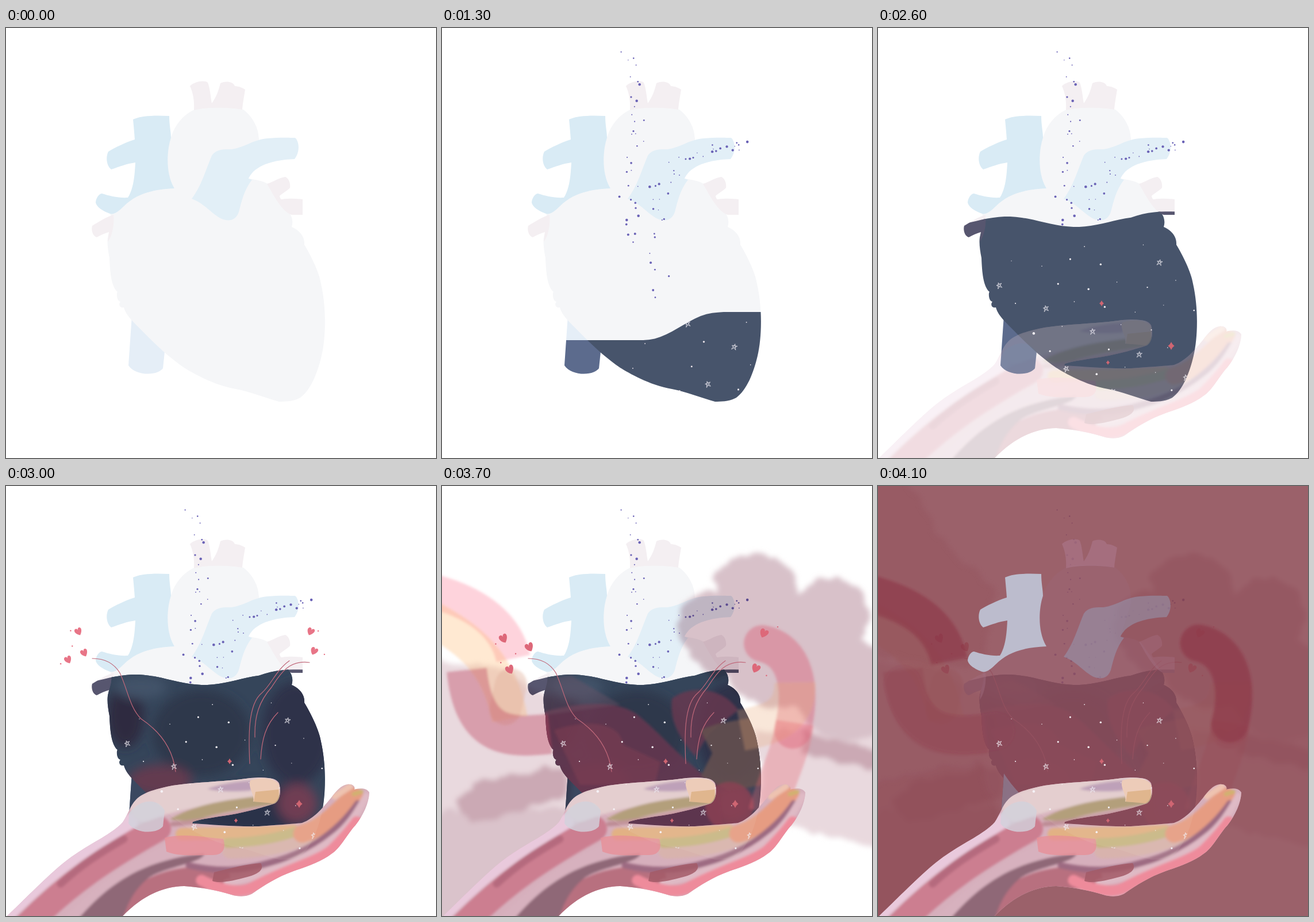
These frames come from a looping animation (748 by 748 pixels, 4.2 s). An HTML page:

```html
<!DOCTYPE html>
<html lang="en">
<head>
<meta charset="utf-8">
<title>Heart in hand</title>
<style>
  html, body { margin: 0; width: 100%; height: 100%; overflow: hidden; background: #fff; }
  svg { display: block; width: 100vw; height: 100vh; }
  .line { fill: none; stroke-linecap: round; stroke-linejoin: round; }
  .butt { fill: none; stroke-linecap: butt; stroke-linejoin: round; }
  #clouds { mix-blend-mode: multiply; }
</style>
</head>
<body>
<svg viewBox="0 0 748 748" xmlns="http://www.w3.org/2000/svg">
  <defs>
    <path id="body" d="M181,323C200,308 222,287 260,282C275,280 285,280 293,279C275,250 278,205 288,188C295,165 315,143 340,138C365,135 400,138 413,142C430,155 440,175 440,195L440,205L422,262L428,263C440,265 450,267 458,273C470,290 480,305 490,318C498,327 500,337 497,346C510,352 520,362 519,377C530,395 545,425 548,445C558,490 556,540 549,570C542,600 530,630 512,643C500,650 485,650 475,650C450,643 425,633 400,628C360,621 325,600 310,591C275,567 250,540 230,520C215,505 208,497 205,486C198,488 195,481 199,476C192,475 192,460 194,459C183,450 181,425 180,400C177,385 175,370 178,360C182,345 186,335 181,323Z"/>
    <path id="cava" d="M221,159C235,152 260,152 284,153C284,170 287,180 287,191C279,215 278,255 293,279C250,281 225,290 205,310C195,320 187,325 181,323C170,319 157,312 156,303C157,295 162,288 167,288C180,292 195,296 212,295C222,280 224,255 225,234C210,236 198,241 183,246C175,240 173,225 178,215C190,208 205,200 224,194C223,180 222,170 221,159Z"/>
    <path id="arch" d="M327,143C328,125 325,112 320,101C328,93 345,90 351,95C355,105 356,120 358,131C366,120 370,108 373,96C380,92 395,92 398,101C405,101 413,105 416,107C414,120 412,130 411,142C390,138 350,137 327,143Z"/>
    <path id="sides" d="M454,271C465,268 475,260 486,259C493,262 495,272 494,278C488,284 480,288 476,292C477,297 478,298 480,298C495,296 507,297 516,298L516,325L497,325C480,320 465,290 454,271ZM187,325C175,328 160,338 150,344C148,350 150,362 158,364C165,360 172,357 179,355L177,372C185,362 189,340 187,325Z"/>
    <path id="artery" d="M323,297C340,275 348,245 358,222C366,210 380,211 392,211C415,208 430,194 455,192C475,190 495,191 503,191C510,197 512,215 502,228C480,229 450,232 430,250C424,257 422,261 422,262L428,264C415,280 410,300 405,320C400,335 388,337 375,332C360,325 345,305 323,297Z"/>
    <path id="stem" d="M219,500L213,587C225,605 262,606 273,592L276,563C255,545 235,525 219,500Z"/>
    <path id="palm" d="M2,748C40,712 85,664 120,641C150,620 185,605 203,585C212,572 216,556 226,546C238,533 260,527 290,521C330,515 385,514 425,508C450,506 470,507 475,517C479,530 477,546 468,552C450,558 420,567 390,572C365,576 340,579 325,584L324,587C360,589 400,593 440,592C470,590 500,588 515,586C535,579 550,561 565,543C575,530 582,521 594,519C602,518 608,522 606,528C615,525 628,525 632,533C631,552 622,572 608,590C593,606 582,630 566,640C548,654 520,663 500,670C470,681 450,694 430,708C420,715 405,715 392,711C370,704 340,698 310,696C275,697 240,710 203,748Z"/>
    <path id="star" class="line" d="M-4,5L0,-6L4,5L-5,-2L5,-3Z" stroke="#f1eef4" stroke-width=".8"/>
    <path id="love" d="M0,1.2C-1.4,.2 -1.2,-1 -.5,-1Q0,-1 0,-.4Q.1,-1 .6,-1C1.3,-.9 1.2,.2 0,1.2Z"/>
    <path id="spark" d="M0,-1Q.3,-.3 .8,0Q.3,.3 0,1Q-.3,.3 -.8,0Q-.3,-.3 0,-1Z" fill="#cf6572"/>
    <clipPath id="level"><path id="surface"/></clipPath>
    <clipPath id="inBody"><use href="#body"/></clipPath>
    <clipPath id="inPalm"><use href="#palm"/></clipPath>
    <filter id="soft" x="-20%" y="-20%" width="140%" height="140%"><feGaussianBlur stdDeviation="2"/></filter>
    <filter id="mist" x="-40%" y="-40%" width="180%" height="180%"><feGaussianBlur stdDeviation="9"/></filter>
    <filter id="puff" filterUnits="userSpaceOnUse" x="-60" y="-60" width="868" height="868">
      <feTurbulence type="fractalNoise" baseFrequency=".03" numOctaves="3" seed="4"/>
      <feDisplacementMap in="SourceGraphic" scale="24" xChannelSelector="R" yChannelSelector="G"/>
      <feGaussianBlur stdDeviation="5"/>
    </filter>
  </defs>

  <use href="#stem" fill="#e5eef7"/>
  <use href="#body" fill="#f5f6f8"/>
  <use href="#cava" fill="#d9ebf5"/>
  <use href="#arch" fill="#f4eff2"/>
  <use href="#sides" fill="#f4eff2"/>
  <use href="#artery" fill="#e2eff7"/>
  <g id="dots" fill="#6a62b6"></g>

  <g clip-path="url(#level)">
    <use href="#stem" fill="#5c6b8d"/>
    <use href="#body" fill="#47546b"/>
    <use href="#sides" fill="#57566f"/>
    <g id="nebula">
      <use href="#stem" fill="#3b4860"/>
      <g clip-path="url(#inBody)">
        <use href="#body" fill="#35455a"/>
        <g filter="url(#mist)">
          <ellipse cx="208" cy="400" rx="32" ry="55" fill="#2f2940"/>
          <ellipse cx="340" cy="430" rx="85" ry="75" fill="#2d374b"/>
          <ellipse cx="505" cy="430" rx="60" ry="90" fill="#2e334a"/>
          <ellipse cx="430" cy="560" rx="110" ry="45" fill="#2b3149"/>
          <ellipse cx="235" cy="350" rx="45" ry="20" fill="#435369"/>
          <ellipse cx="268" cy="512" rx="55" ry="27" fill="#643a50"/>
          <ellipse cx="507" cy="552" rx="34" ry="34" fill="#703d53"/>
        </g>
      </g>
    </g>
    <g id="early" clip-path="url(#inBody)" fill="#f1e9ef"></g>
  </g>

  <g id="clouds">
    <g filter="url(#puff)">
      <path fill="#e9d9de" d="M-40,300L90,310L190,370L230,480L220,600L60,780L-60,780ZM545,430L800,400L800,620C730,645 650,590 560,585Z"/>
      <path fill="#dac3cb" d="M-40,570L215,560L210,620L40,790L-40,790Z"/>
      <g fill="#d8c1c9">
        <circle cx="545" cy="188" r="73"/><circle cx="462" cy="240" r="54"/>
        <circle cx="676" cy="228" r="67"/><circle cx="590" cy="285" r="102"/>
        <circle cx="705" cy="355" r="90"/><circle cx="480" cy="285" r="48"/>
      </g>
      <path fill="#cba9b4" d="M28,555C40,510 110,510 150,498C200,480 230,505 215,540C150,560 80,590 40,585ZM630,420C670,455 720,440 770,465L770,492C700,490 660,470 625,465Z"/>
    </g>
  </g>

  <g id="arms">
    <g clip-path="url(#inBody)">
      <g filter="url(#soft)">
        <path fill="#67384f" fill-opacity=".85" d="M170,395C240,375 310,370 345,402C390,440 420,480 480,520L490,610L190,610Z"/>
        <path fill="#6f5468" fill-opacity=".4" d="M170,335L225,330L310,380L170,400Z"/>
        <path fill="#8f4055" fill-opacity=".35" d="M195,425C250,405 310,410 315,450L380,480L370,520L240,520Z"/>
        <path fill="#693a50" fill-opacity=".8" d="M400,370C430,345 490,350 515,390L465,430L440,470C415,440 395,410 400,370Z"/>
        <path fill="#64504f" fill-opacity=".9" d="M450,425C490,405 530,410 560,395L560,520L500,530L450,505L470,465Z"/>
        <circle fill="#8c4254" fill-opacity=".8" cx="500" cy="557" r="42"/>
      </g>
    </g>
    <g filter="url(#soft)">
      <path class="butt" stroke="#fa6e8c" stroke-opacity=".3" stroke-width="60" d="M-20,182C50,200 110,235 124,300"/>
      <path class="butt" stroke="#ffb76a" stroke-opacity=".3" stroke-width="62" d="M-20,230C45,265 100,305 118,405"/>
      <path class="line" stroke="#e0b09a" stroke-opacity=".4" stroke-width="56" d="M120,345L110,388"/>
      <path class="butt" stroke="#be4660" stroke-opacity=".4" stroke-width="70" d="M43,320C55,435 110,440 188,431"/>
      <path class="line" stroke="#dc506a" stroke-opacity=".36" stroke-width="64" d="M557,274C615,285 628,350 610,425"/>
      <path class="butt" stroke="#e8a878" stroke-opacity=".28" stroke-width="72" d="M614,342C615,405 570,415 520,425"/>
      <path class="butt" stroke="#e66470" stroke-opacity=".33" stroke-width="66" d="M614,412C605,470 585,500 565,570"/>
    </g>
  </g>

  <g id="branches" class="line" stroke="#c0687a" stroke-width="1.2">
    <path d="M150,300C175,300 190,312 198,325C212,355 215,385 235,405C265,425 290,455 295,497"/>
    <path d="M493,304C470,320 462,345 445,360C420,380 422,440 424,483"/>
    <path d="M528,307C490,302 475,330 462,350C440,375 432,400 433,437"/>
    <path d="M473,394C452,415 445,440 443,475"/>
  </g>
  <g id="buds" fill="#e87587"></g>
  <g id="drift" fill="#dd6879"></g>

  <g id="wash">
    <rect width="748" height="748" fill="#8a4651" opacity=".85"/>
    <g filter="url(#puff)" fill="#8c4450" opacity=".22">
      <path d="M-40,-40L40,-20L110,90L200,180L190,320L-40,290Z"/>
      <path d="M-40,520L180,480L210,580L20,760L-40,760Z"/>
    </g>
    <g class="line" stroke="#8b2f3e" stroke-opacity=".45" stroke-width="64" filter="url(#soft)">
      <path class="butt" d="M-20,186C50,204 110,235 124,305"/>
      <path d="M558,273C615,285 630,350 612,414"/>
      <path stroke-opacity=".13" d="M43,345C65,435 130,440 205,426"/>
    </g>
    <use href="#body" fill="#a07c9c" opacity=".12"/>
    <use href="#arch" fill="#aa778a" opacity=".6"/>
    <use href="#sides" fill="#aa778a" opacity=".35"/>
    <use href="#artery" fill="#9791ab" opacity=".6"/>
    <use href="#stem" fill="#8f7c92" opacity=".8"/>
    <use href="#cava" fill="#bcbccd"/>
  </g>

  <g id="hand">
    <use href="#palm" fill="#d6afbc"/>
    <g clip-path="url(#inPalm)">
      <g filter="url(#soft)" class="line">
        <path stroke="#e9c9dc" stroke-width="28" d="M0,746C65,682 125,632 215,584"/>
        <path stroke="#cc7e90" stroke-width="44" d="M35,765C110,690 170,650 265,596"/>
        <path stroke="#b56a7e" stroke-width="13" d="M95,692C130,660 160,640 205,614"/>
        <path stroke="#d7b1be" stroke-width="27" d="M105,765C170,700 230,655 320,620"/>
        <path stroke="#b8707f" stroke-width="40" d="M205,745C235,700 290,678 370,682"/>
        <path fill="#8f6877" d="M120,760C170,700 230,650 345,640C340,655 280,662 250,680C225,700 210,725 202,760Z"/>
        <path stroke="#e3cccf" stroke-width="48" d="M240,560C290,540 340,530 445,520"/>
        <path fill="#b99ab6" d="M350,527C380,515 420,512 440,512L425,530C400,532 370,532 350,527Z"/>
        <path fill="#ad9772" d="M285,580C340,547 400,545 478,535L478,552C420,560 350,572 325,584Z"/>
        <path stroke="#bd8b94" stroke-width="8" d="M290,588C350,584 410,568 465,560"/>
        <path stroke="#d8b3ad" stroke-width="28" d="M390,634C460,634 520,620 575,575"/>
        <path stroke="#e2b184" stroke-width="22" d="M306,606C370,603 430,605 500,600"/>
        <path stroke="#c7b683" stroke-width="17" d="M385,621C430,620 470,613 505,601"/>
        <path stroke="#e69c82" stroke-width="31" d="M515,605C555,595 580,560 606,540"/>
        <path stroke="#eec3b0" stroke-width="11" d="M572,540L598,523"/>
        <path stroke="#cfb36e" stroke-width="7" d="M605,536L618,532"/>
        <path stroke="#9d6b82" stroke-width="11" d="M318,660C370,672 410,670 460,655C520,640 575,605 612,552"/>
        <path stroke="#dfbac5" stroke-width="13" d="M385,690C460,675 530,645 570,612C600,590 615,560 627,540"/>
        <path stroke="#ee8b9b" stroke-width="19" d="M340,686C380,706 410,708 430,698C480,670 540,655 567,633C580,620 595,605 610,584"/>
      </g>
      <path fill="#e98e96" fill-opacity=".75" d="M276,612C310,603 350,612 378,614C383,630 378,642 360,642C330,642 300,645 279,636Z"/>
      <path fill="#a45b68" fill-opacity=".85" d="M362,672C390,665 420,657 443,656C450,666 440,675 420,680C395,687 370,692 359,687Z"/>
      <path fill="#edc9b6" d="M425,512C445,506 470,508 475,520C478,535 474,545 465,550L430,549C433,535 420,525 425,512Z"/>
      <path fill="#dfb187" d="M434,532L474,528Q477,546 465,552L431,549Z"/>
      <path fill="#d2d2dc" fill-opacity=".8" d="M214,570C235,540 268,545 276,565L273,592C262,606 225,605 213,587Z"/>
      <use href="#body" fill="#e5dfc8" opacity=".1"/>
    </g>
  </g>

  <g id="late" clip-path="url(#inBody)" fill="#f6f2f6">
    <use href="#spark" transform="translate(389 479) scale(5)"/>
    <use href="#spark" transform="translate(510 553) scale(7)"/>
    <use href="#spark" transform="translate(400 582) scale(4)"/>
  </g>
</svg>

<script>
const $ = id => document.getElementById(id);
const FRAME = 100, COUNT = 42;

const ramp = (f, a, b) => Math.min(1, Math.max(0, (f - a) / (b - a)));
const smooth = (x, a, b) => { const p = ramp(x, a, b); return p * p * (3 - 2 * p); };
const lerp = (a, b, p) => a + (b - a) * p;

function seeded(seed) {
  return () => {
    seed = (seed * 1664525 + 1013904223) % 4294967296;
    return seed / 4294967296;
  };
}

function add(parent, tag, attrs) {
  const el = document.createElementNS('http://www.w3.org/2000/svg', tag);
  for (const key in attrs) el.setAttribute(key, attrs[key]);
  parent.append(el);
  return el;
}

// Point at fraction t of a polyline.
function along(points, t) {
  const at = t * (points.length - 1), i = Math.min(Math.floor(at), points.length - 2);
  return [0, 1].map(k => lerp(points[i][k], points[i + 1][k], at - i));
}

// Particles drift evenly down a stream, scattered to both sides of it.
function stream(points, count, spread, seed) {
  const random = seeded(seed);
  return Array.from({ length: count }, (_, i) => {
    const [x, y] = along(points, i / (count - 1));
    return add($('dots'), 'circle', {
      cx: x + (random() * 2 - 1) * spread,
      cy: y + (random() * 2 - 1) * spread / 2,
      r: .7 + 1.6 * random()
    });
  });
}

// Evenly spread night sky; every fifth light is a scribbled star.
function sky(parent, count, seed) {
  const random = seeded(seed);
  for (let i = 0; i < count; i++) {
    const x = 190 + 360 * ((seed * .37 + i * .7549) % 1), y = 375 + 265 * ((seed * .61 + i * .5698) % 1);
    if (i % 5) add(parent, 'circle', { cx: x, cy: y, r: .7 + 1.6 * random() ** 2 });
    else add(parent, 'use', { href: '#star', transform: `translate(${x} ${y}) rotate(${random() * 40 - 20}) scale(.9)` });
  }
}

// Little hearts lean away from the middle, each with a crumb beside it.
function hearts(parent, points, size, seed) {
  const random = seeded(seed);
  for (const [x, y] of points) {
    const side = x < 374 ? -1 : 1;
    add(parent, 'use', { href: '#love', transform: `translate(${x} ${y}) rotate(${side * 25}) scale(${size})` });
    add(parent, 'circle', { cx: x + side * (10 + 15 * random()), cy: y + 30 * random() - 15, r: 1.2 });
  }
}

const drops = [
  ...stream([[320, 38], [336, 130], [342, 205], [320, 300], [336, 375]], 34, 16, 5),
  ...stream([[540, 205], [485, 208], [415, 224], [378, 275], [376, 335], [382, 470]], 41, 17, 9)
].sort((a, b) => a.getAttribute('cy') - b.getAttribute('cy'));
sky($('early'), 34, 3);
sky($('late'), 45, 8);
hearts($('buds'), [[126, 253], [108, 302], [136, 290], [530, 253], [536, 287]], 6, 2);
hearts($('drift'), [[107, 265], [152, 280], [118, 319], [560, 256], [546, 317]], 7, 6);

const low = x => 642 - 57 * smooth(x, 350, 470);
const middle = x => 414.5 - 38.5 * smooth(x, 365, 495);
const full = x => 337 - 9 * Math.cos((x - 225) / 38) - .21 * Math.max(0, x - 440);

function surfacePath(f) {
  const rise = ramp(f, 7, 19) ** 1.2, top = ramp(f, 19, 23), sink = 30 * Math.max(0, 7 - f);
  let d = 'M140,760';
  for (let x = 140; x <= 570; x += 10) {
    d += `L${x},${lerp(lerp(low(x), middle(x), rise), full(x), top) + sink}`;
  }
  return d + 'L570,760Z';
}

function draw(f) {
  const shown = drops.length * ramp(f, 0, 3);
  drops.forEach((drop, i) => drop.setAttribute('visibility', i < shown ? 'visible' : 'hidden'));
  $('surface').setAttribute('d', surfacePath(f));
  const opacity = {
    early: f < 23 ? 1 : 0,
    late: f < 23 ? 0 : 1,
    nebula: ramp(f, 26, 30),
    branches: ramp(f, 27, 30),
    buds: f > 28 && f < 34 ? 1 : 0,
    drift: f < 34 ? 0 : 1,
    arms: ramp(f, 30, 36),
    clouds: ramp(f, 34, 37),
    wash: ramp(f, 37, 41),
    hand: ramp(f, 24, 30) ** 1.2
  };
  for (const id in opacity) $(id).setAttribute('opacity', opacity[id]);
}

let last = -1;
const start = performance.now();
function tick() {
  const f = Math.floor((performance.now() - start) / FRAME) % COUNT;
  if (f !== last) draw(last = f);
  requestAnimationFrame(tick);
}
tick();
</script>
</body>
</html>
```
